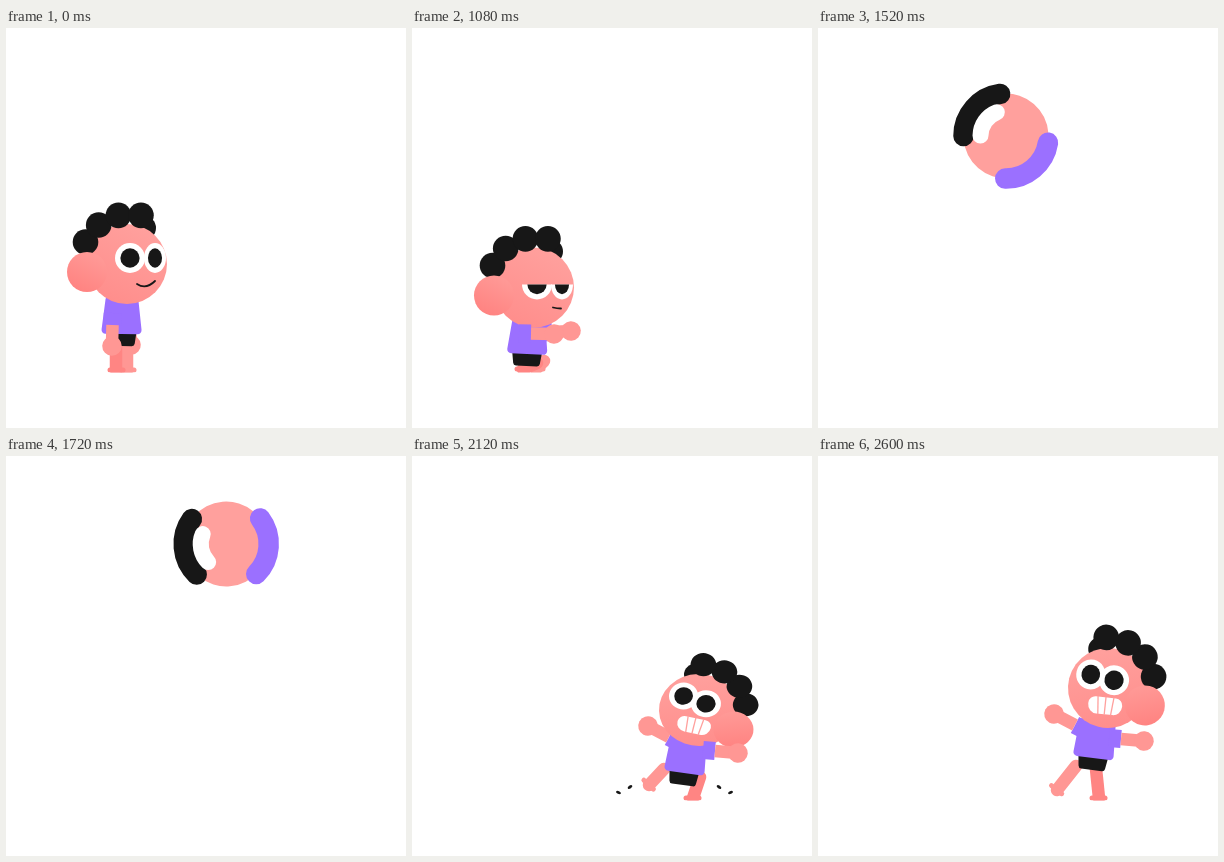
These frames come from a looping animation (400 by 400 pixels, 3.28 s). An HTML page with a canvas:

```html
<!DOCTYPE html>
<html lang="en">
<head>
<meta charset="utf-8">
<title>Flip jump</title>
<style>
  html, body { margin: 0; width: 100%; height: 100%; overflow: hidden; background: #fff; }
  canvas { display: block; width: 100vw; height: 100vh; }
</style>
</head>
<body>
<canvas id="stage" width="400" height="400"></canvas>
<script>
const LOOP = 3280, STEP = 40, GROUND = 344.5, RAD = Math.PI / 180;
const TAKEOFF = 1400, LANDING = 2040;
const BLACK = '#171717', WHITE = '#fff', PURPLE = '#9b70ff';
const SKIN = '#ffa09d', LIMB = '#ff9794', DEEP = '#ff8583';
const ctx = document.getElementById('stage').getContext('2d');

// A pose faces right. Arms run from sleeve end to hand, legs from hip to foot.
const stand = {
  head: [121, 236], tilt: 0, squash: 1, lid: 0, smile: 1,
  chest: [116, 268], hem: [115.5, 306],
  nearArm: [106.5, 297, 106, 318], farArm: [124, 300, 125, 317],
  nearLeg: [110, 313, 110, 342], farLeg: [121, 313, 121, 342]
};
const dip = {
  ...stand, head: [117.5, 246.5], tilt: -5, lid: .55, smile: .4,
  chest: [118, 284], hem: [113, 318],
  nearArm: [120, 295, 131.5, 315], farArm: [136, 294, 148, 311],
  nearLeg: [123, 326, 111, 342], farLeg: [128, 327, 122, 342]
};
const crouch = {
  ...dip, head: [122, 259.5], tilt: 0, lid: 1, smile: 0,
  chest: [117, 289], hem: [115, 326],
  nearArm: [119, 305.5, 142, 306], farArm: [140, 304, 159, 303],
  nearLeg: [125, 335, 111, 341], farLeg: [132, 333, 124, 341]
};
const cheer = {
  ...stand, head: [110, 232], tilt: -14,
  chest: [120, 264], hem: [125, 302],
  nearArm: [97, 283, 74, 285], farArm: [143, 269, 164, 258],
  nearLeg: [122, 313, 119, 342], farLeg: [142, 310, 161, 334]
};
const shift = (pose, dx, dy) => Object.fromEntries(Object.entries(pose).map(([name, v]) =>
  [name, Array.isArray(v) ? v.map((c, i) => c + (i % 2 ? dy : dx)) : v]));
const land = {
  ...shift(cheer, 0, 12), head: [113, 254], tilt: -21, squash: .9,
  chest: [123, 282], hem: [128, 317],
  nearLeg: [112, 321, 119, 342], farLeg: [148, 313, 163, 329]
};

const linear = k => k;
const easeIn = k => k * k;
const easeOut = k => 1 - (1 - k) ** 3;
const mix = (a, b, k) => Array.isArray(a) ? a.map((v, i) => mix(v, b[i], k)) : a + (b - a) * k;

const before = [
  [0, stand], [480, stand], [600, dip], [1080, crouch, easeOut],
  [1280, crouch], [TAKEOFF, shift(stand, 24, -46), easeIn]
];
const after = [
  [LANDING, shift(cheer, 8, -70)], [2120, land], [2160, shift(land, -1, 2)],
  [2600, cheer, easeOut], [LOOP, cheer]
];
function poseAt(keys, t) {
  const i = Math.max(1, keys.findIndex(key => key[0] >= t));
  const [t0, a] = keys[i - 1], [t1, b, ease = linear] = keys[i];
  const k = ease((t - t0) / (t1 - t0));
  return Object.fromEntries(Object.keys(a).map(name => [name, mix(a[name], b[name], k)]));
}

function local(x, y, degrees, draw) {
  ctx.save();
  ctx.translate(x, y);
  ctx.rotate(degrees * RAD);
  draw();
  ctx.restore();
}
function disc(x, y, rx, fill, ry = rx) {
  ctx.fillStyle = fill;
  ctx.beginPath();
  ctx.ellipse(x, y, rx, ry, 0, 0, 7);
  ctx.fill();
}
function line(x0, y0, x1, y1, width, color, cap = 'butt') {
  ctx.strokeStyle = color;
  ctx.lineWidth = width;
  ctx.lineCap = cap;
  ctx.beginPath();
  ctx.moveTo(x0, y0);
  ctx.lineTo(x1, y1);
  ctx.stroke();
}
// Symmetric panel with rounded corners, from half-width a at y0 to b at y1.
function panel(a, y0, b, y1, r, color) {
  ctx.fillStyle = color;
  ctx.beginPath();
  ctx.moveTo(0, y0);
  ctx.arcTo(a, y0, b, y1, r);
  ctx.arcTo(b, y1, -b, y1, r);
  ctx.arcTo(-b, y1, -a, y0, r);
  ctx.arcTo(-a, y0, a, y0, r);
  ctx.fill();
}
function skinDisc(x, y, r, light, dark) {
  const fill = ctx.createLinearGradient(x + r / 2, y - r, x - r / 2, y + r);
  fill.addColorStop(0, light);
  fill.addColorStop(1, dark);
  disc(x, y, r, fill);
}

function drawArm([x, y, handX, handY]) {
  local(x, y, Math.atan2(handY - y, handX - x) / RAD, () => {
    const reach = Math.hypot(handX - x, handY - y);
    line(-12, 0, 0, 0, 18, PURPLE);
    line(0, 0, reach, 0, 12.5, LIMB);
    disc(reach, 0, 9.8, LIMB);
  });
}
function drawLeg([x, y, footX, footY], color) {
  const planted = footY >= 340;
  const angle = planted ? 0 : Math.atan2(footY - y, footX - x) / RAD - 90;
  line(x, y, footX, footY, 12.5, color, 'round');
  local(footX, footY, angle, () => line(-6, 0, 7, 0, 5, color, 'round'));
}
function drawBody({ chest, hem }, turn) {
  const dx = hem[0] - chest[0], dy = hem[1] - chest[1];
  local(...hem, Math.atan2(dy, dx) / RAD - 90, () => {
    panel(15.5, -6, 13, 12, 3, BLACK);
    panel(18 - 2 * turn, -Math.hypot(dx, dy), 20.5, 0, 4, PURPLE);
  });
}

function drawEyes(turn, lid) {
  const y = -9 + 3 * turn + 3 * lid;
  const eyes = [[20 + 8 * turn, 14.5 - 3.5 * turn], [-4 + 7 * turn, 15]];
  ctx.save();
  ctx.beginPath();
  ctx.rect(-30, y - 16 + 16 * lid, 80, 40);
  ctx.clip();
  for (const [x, rx] of eyes) disc(x, y, rx, WHITE, 15);
  for (const [x, rx] of eyes) disc(x, y, rx * .64, BLACK, 9.7);
  ctx.restore();
}
function drawSmile(smile) {
  const x = 23 - 4 * smile, half = 4 + 5 * smile;
  ctx.strokeStyle = BLACK;
  ctx.lineWidth = 1.8;
  ctx.lineCap = 'round';
  ctx.beginPath();
  ctx.moveTo(x - half, 20);
  ctx.quadraticCurveTo(x, 21 + 5 * smile, x + half, 21 - 4 * smile);
  ctx.stroke();
}
function drawGrin() {
  local(-1.5, 18, 8, () => {
    ctx.fillStyle = WHITE;
    ctx.beginPath();
    ctx.roundRect(-17, -8.5, 34, 17, [7, 7, 9, 9]);
    ctx.fill();
    for (const x of [-8, 0, 8]) line(x, -9, x * .8, 9, 1.3, SKIN);
  });
}
function drawHead(p, turn) {
  local(...p.head, 0, () => {
    ctx.scale(1, p.squash);
    ctx.rotate(p.tilt * RAD);
    disc(17, -36, 12, BLACK);
    skinDisc(0, 0, 40, '#ffa19e', '#ff8d8b');
    for (let i = 0; i < 4; i++) {
      const angle = (208 + 26 * i) * RAD, orbit = 47 + 1.2 * i;
      disc(orbit * Math.cos(angle), orbit * Math.sin(angle), 12.8, BLACK);
    }
    skinDisc(-40, 8, 20, '#ff9b98', '#ff8280');
    drawEyes(turn, p.lid);
    turn ? drawSmile(p.smile) : drawGrin();
  });
}
function drawFigure(p, turn) {
  drawArm(p.farArm);
  ctx.save();
  ctx.beginPath();
  ctx.rect(0, 0, 400, GROUND);
  ctx.clip();
  drawLeg(p.farLeg, LIMB);
  drawLeg(p.nearLeg, DEEP);
  ctx.restore();
  drawBody(p, turn);
  drawHead(p, turn);
  drawArm(p.nearArm);
}

function ring(radius, middle, half, width, color) {
  ctx.strokeStyle = color;
  ctx.lineWidth = width;
  ctx.lineCap = 'round';
  ctx.beginPath();
  ctx.arc(0, 0, radius, (middle - half) * RAD, (middle + half) * RAD);
  ctx.stroke();
}
// The spinning blur hangs near the top of its path and drops faster than it rises.
function drawBall(t) {
  const fromTop = t - 1813, span = fromTop < 0 ? 383 : 242, airborne = t - 1520;
  const x = 188 + .161 * airborne, y = 88 + 100 * (fromTop / span) ** 6;
  local(x, y, 221 + 1.57 * airborne, () => {
    disc(0, 0, 42.5, SKIN);
    ring(42.5, 0, 41, 20.5, BLACK);
    ring(25.5, -6, 34, 16, WHITE);
    ring(42.5, -171, 41, 20.5, PURPLE);
  });
}

// Specks thrown out by the landing.
function drawSpecks(t) {
  const k = (t - 2120) / 40;
  if (k < -1 || k > 2) return;
  for (const side of [-1, 1])
    for (const outer of [0, 1])
      local(262.5 + side * (44.5 + 11.5 * outer + 7 * k), 331 + 5.5 * outer + k * k, side * (outer ? -25 : 35),
        () => disc(0, 0, 2.6 - .8 * Math.max(0, k), BLACK, 1.5));
}

const start = performance.now();
function frame() {
  const t = Math.floor((performance.now() - start) % LOOP / STEP) * STEP;
  ctx.clearRect(0, 0, 400, 400);
  if (t <= TAKEOFF) drawFigure(poseAt(before, t), 1);
  else if (t < LANDING) drawBall(t);
  else {
    ctx.save();
    ctx.translate(400, 0);
    ctx.scale(-1, 1);
    drawFigure(poseAt(after, t), 0);
    ctx.restore();
    drawSpecks(t);
  }
  requestAnimationFrame(frame);
}
frame();
</script>
</body>
</html>
```
